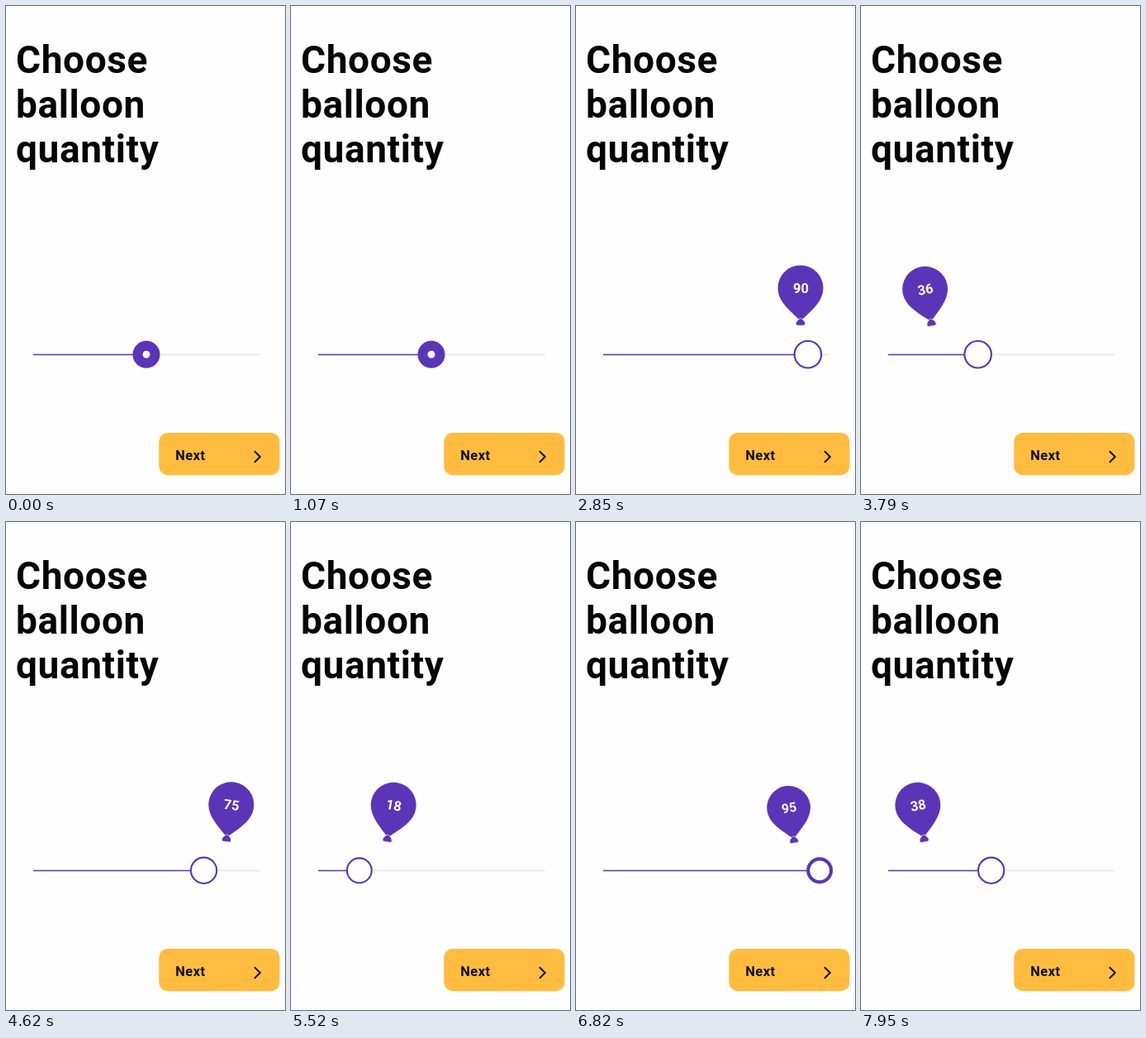
Recreate the animation shown at these times as an HTML page. Size 338 by 590 pixels, loop 8000 ms.

```html
<!DOCTYPE html>
<html lang="en">
<head>
<meta charset="utf-8">
<title>Balloon slider</title>
<style>
  html, body { margin: 0; width: 100%; height: 100%; overflow: hidden; background: #fefefe; }
  svg { display: block; width: 100vw; height: 100vh; }
  text { font-family: Roboto, Arial, sans-serif; font-weight: 700; }
  .title { font-size: 46px; letter-spacing: .6px; fill: #050505; }
  .next { font-size: 16.5px; letter-spacing: .4px; fill: #111; }
  .value { font-size: 16.5px; fill: #fff; text-anchor: middle; }
</style>
</head>
<body>
<svg viewBox="0 0 338 590">
  <rect width="338" height="590" fill="#fefefe"/>
  <g class="title">
    <text x="12" y="81">Choose</text>
    <text x="12" y="135">balloon</text>
    <text x="12" y="189">quantity</text>
  </g>
  <path d="M33 421.5H308" stroke="#e6e6e6" stroke-width="1.3"/>
  <path id="fill" stroke="#5a35b8" stroke-width="1.5"/>
  <g id="balloon">
    <path fill="#5a35b8" d="M-27.5 -80A27.5 27.5 0 0 1 27.5 -80C27.5 -66 17 -56 3.5 -43.5Q0 -40.5 -3.5 -43.5C-17 -56 -27.5 -66 -27.5 -80Z"/>
    <path fill="#5a35b8" stroke="#fefefe" stroke-width=".6" d="M0 -43.6Q1.5 -43.6 4.8 -39.5Q7 -35 3.4 -34.8H-3.4Q-7 -35 -4.8 -39.5Q-1.5 -43.6 0 -43.6Z"/>
    <text id="value" class="value" x="0.4" y="-74"></text>
  </g>
  <circle id="thumb" cy="421.3" fill="#fefefe" stroke="#5a35b8"/>
  <rect x="185.3" y="516" width="146.2" height="51.2" rx="10.5" fill="#ffbc3f"/>
  <text class="next" x="205.3" y="548.5">Next</text>
  <path d="M301 538.3L307.8 545L301 551.7" fill="none" stroke="#111" stroke-width="2"/>
</svg>
<script>
const LOOP = 8000, LEFT = 33, SPAN = 274, Y = 421, LAG = 100;
const $ = id => document.getElementById(id);
const fill = $('fill'), balloon = $('balloon'), value = $('value'), thumb = $('thumb');

// [time, value] keys
const drag = [
  [0, 170], [2000, 170], [2950, 284], [3400, 55], [3523, 55], [4168, 290], [4300, 290],
  [4850, 210], [4989, 210], [5693, 62], [6173, 62], [6886, 300], [7100, 300],
  [7700, 55], [7754, 55], [8188, 295]
];
const radius = [
  [0, 16.5], [1150, 16.5], [1500, 19.8], [2000, 19.8], [2850, 17.3], [3790, 17.3],
  [5520, 16], [6820, 16], [7060, 16.5], [7400, 18], [7950, 16.7], [8000, 16.7]
];
const presses = [1150, 7060], release = 6770;

const clamp = v => Math.min(1, Math.max(0, v));
const sine = p => .5 - .5 * Math.cos(Math.PI * p);
const smooth = (a, b, v) => { const p = clamp((v - a) / (b - a)); return p * p * (3 - 2 * p); };
const backOut = p => { const u = p - 1, c = 1.2; return 1 + (c + 1) * u ** 3 + c * u * u; };

function track(keys, t, ease = p => p) {
  if (t <= keys[0][0]) return keys[0][1];
  const i = keys.findIndex(k => k[0] >= t);
  const [t0, a] = keys[i - 1], [t1, b] = keys[i];
  return a + (b - a) * ease((t - t0) / (t1 - t0));
}
const position = t => track(drag, t, sine);

// balloon scale and ring openness, both 0 at rest
function pressState(t) {
  if (t >= release && t < presses[1]) {
    const p = clamp((t - release) / 250);
    return { scale: 1 - p * p, open: 1 - p };
  }
  const since = t - presses[t < release ? 0 : 1];
  return { scale: backOut(clamp(since / 650)), open: sine(clamp(since / 300)) };
}

function draw(t) {
  const x = position(t), bx = position(t - LAG), lag = x - bx;
  const { scale, open } = pressState(t);
  const tilt = -Math.sign(lag) * 10.5 * smooth(8, 30, Math.abs(lag));
  balloon.setAttribute('transform', `translate(${bx} ${Y}) rotate(${tilt}) scale(${Math.max(0, scale)})`);
  balloon.setAttribute('visibility', scale > .01 ? 'visible' : 'hidden');

  // the number trails fast drags
  const v = (position(t + 10) - position(t - 10)) / 20;
  value.textContent = Math.floor((x - 25 * v * Math.abs(v) - LEFT) / SPAN * 100 + 1e-6);

  const ring = 12 - 9.9 * open;
  thumb.setAttribute('cx', x);
  thumb.setAttribute('r', track(radius, t) - ring / 2);
  thumb.setAttribute('stroke-width', ring);
  fill.setAttribute('d', `M${LEFT} 421.5H${x}`);
}

const start = performance.now();
function tick() {
  draw((performance.now() - start) % LOOP);
  requestAnimationFrame(tick);
}
tick();
</script>
</body>
</html>
```
